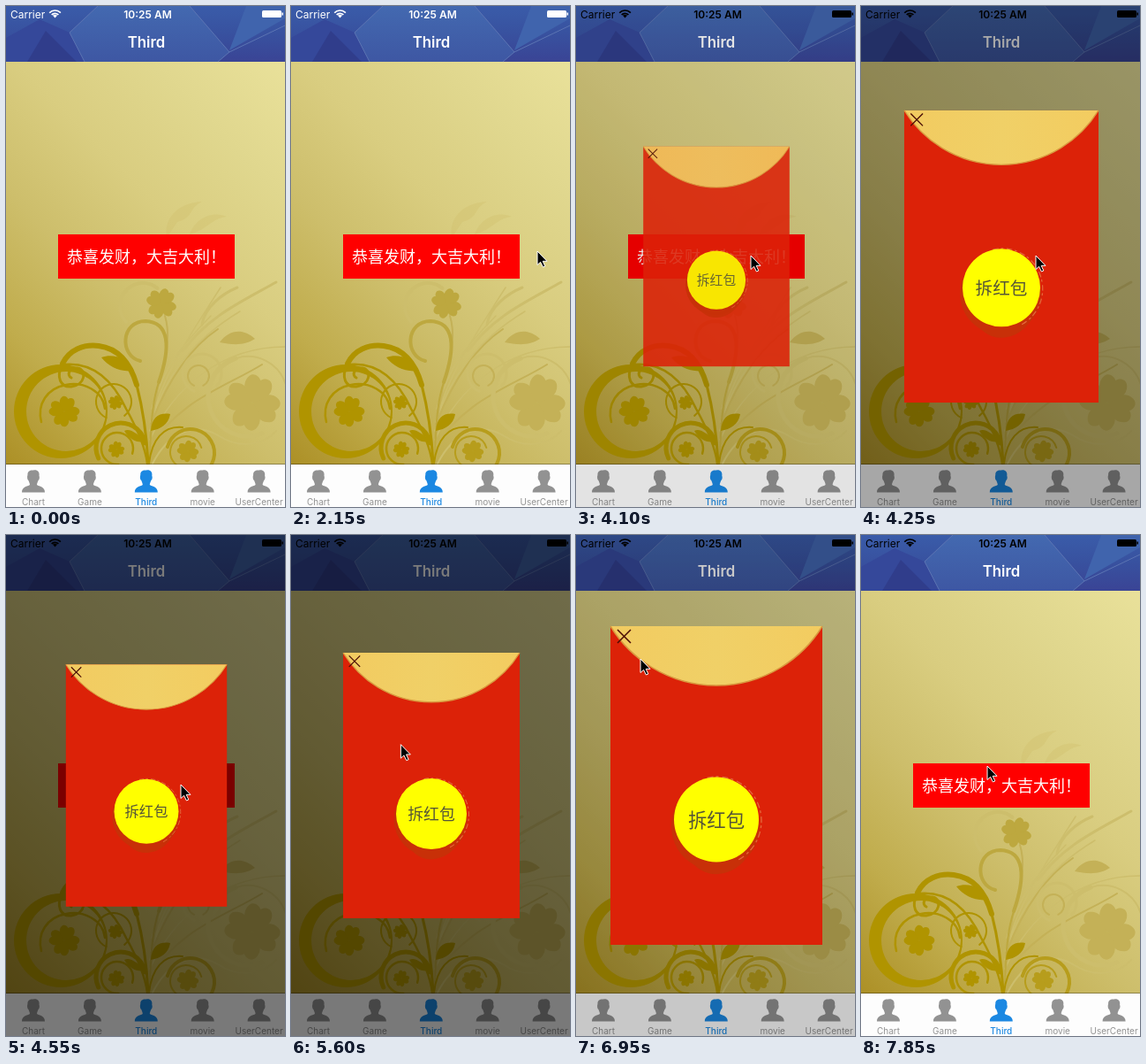
Animation of 316x566 px, one loop 8 s. Source, as an HTML page with a canvas:

```html
<!DOCTYPE html>
<html lang="zh-CN">
<head>
<meta charset="utf-8">
<title>Red packet</title>
<style>
html, body { margin: 0; height: 100%; overflow: hidden; }
canvas { display: block; }
</style>
</head>
<body>
<canvas id="stage" width="316" height="566"></canvas>
<script>
const ctx = document.getElementById('stage').getContext('2d');
const LATIN = 'Inter, Roboto, sans-serif';
const HAN = '"Noto Sans CJK SC", "Noto Sans CJK", sans-serif';
const LOOP = 8000, FIRST = 500, STEP = 150;
const OPEN = 4100, CLOSED = 7250;

// time, x, y of the pointer tip
const pointer = [
  [500, 287, 404], [650, 287, 404], [800, 241, 355], [950, 241, 376], [1100, 241, 376],
  [1250, 243, 350], [1550, 268, 275], [1700, 279, 255], [2000, 279, 255], [2150, 279, 277],
  [2300, 280, 308], [2600, 268, 370], [2750, 263, 380], [3200, 263, 380], [4100, 198, 282],
  [5000, 198, 282], [5150, 111, 217], [5300, 136, 257], [5450, 136, 257], [6350, 66, 135],
  [6500, 73, 140], [7400, 73, 140], [7850, 143, 261]
];
// time, scale, opacity, dimming
const popup = [
  [4100, .69, .88, .1], [4250, .917, 1, .34], [4400, .85, 1, .49], [4550, .76, 1, .52],
  [4850, .833, 1, .52], [6500, .833, 1, .52], [6650, .854, 1, .51], [6950, 1, 1, .21],
  [7100, .45, 1, .06], [7250, .01, 0, 0]
];

function sample(track, t) {
  const next = track.findIndex(key => key[0] > t);
  if (next < 0) return track[track.length - 1].slice(1);
  const a = track[Math.max(next - 1, 0)], b = track[next];
  const k = a === b ? 0 : (t - a[0]) / (b[0] - a[0]);
  return a.slice(1).map((v, i) => v + (b[i + 1] - v) * k);
}

function gradient(x0, y0, x1, y1, ...colors) {
  const g = ctx.createLinearGradient(x0, y0, x1, y1);
  colors.forEach((c, i) => g.addColorStop(i / (colors.length - 1), c));
  return g;
}

function rect(color, x, y, w, h) {
  ctx.fillStyle = color;
  ctx.fillRect(x, y, w, h);
}

function fill(color, path) {
  ctx.fillStyle = color;
  ctx.fill(new Path2D(path));
}

function line(color, width, path) {
  ctx.strokeStyle = color;
  ctx.lineWidth = width;
  ctx.stroke(new Path2D(path));
}

function disc(color, x, y, r) {
  ctx.fillStyle = color;
  ctx.beginPath();
  ctx.arc(x, y, r, 0, 7);
  ctx.fill();
}

function ring(color, width, x, y, r, from = 0, to = 2 * Math.PI) {
  ctx.strokeStyle = color;
  ctx.lineWidth = width;
  ctx.beginPath();
  ctx.arc(x, y, r, from, to);
  ctx.stroke();
}

function text(str, x, y, font, color, align = 'center') {
  ctx.font = font;
  ctx.fillStyle = color;
  ctx.textAlign = align;
  ctx.fillText(str, x, y);
}

// four heart-shaped petals
function clover(color, x, y, r, turn) {
  ctx.save();
  ctx.translate(x, y);
  ctx.scale(r, r);
  ctx.rotate(turn);
  for (let i = 0; i < 4; i++) {
    fill(color, 'M0 0C.2 -.35 .5 -.62 .85 -.45C1.05 -.35 1 -.1 .86 0C1 .1 1.05 .35 .85 .45C.5 .62 .2 .35 0 0Z');
    ctx.rotate(Math.PI / 2);
  }
  ctx.restore();
}

// ring that is thick on its left side and thin on its right
function crescent(color, x, y, r, thick) {
  ctx.fillStyle = color;
  ctx.beginPath();
  ctx.arc(x, y, r, 0, 7);
  ctx.closePath();
  ctx.moveTo(x + r, y);
  ctx.arc(x + thick / 2 - 1, y, r - thick / 2 - 1, 0, 7);
  ctx.fill('evenodd');
}

function wallpaper() {
  rect(gradient(0, 517, 385, 132, '#ac9026', '#c0ac4c', '#cdbe6b', '#d9cd80', '#e0d78e', '#e9e19a'), 0, 63, 316, 455);
  const dark = '#b09400', mid = '#bda83f', soft = '#c4b157', faint = '#cdbe6c';
  ctx.lineCap = 'round';
  ctx.globalAlpha = .35;
  fill(faint, 'M182 262C178 235 200 222 222 221C206 229 213 239 194 244ZM208 258C216 236 238 232 250 238C232 240 230 252 208 258Z');
  ctx.globalAlpha = 1;

  // fan of stems on the right
  line(faint, 3, 'M200 390C230 350 265 335 306 312M222 360C225 340 245 325 262 318');
  line(faint, 1.5, 'M163 480C175 420 215 375 265 345M164 470C180 410 210 370 243 318M163 490C190 430 245 385 316 385M165 455C180 405 198 385 232 350');
  line(soft, 2, 'M165 470C185 420 210 385 240 365M163 500C195 445 250 430 290 405');
  fill(soft, 'M242 380C252 366 268 363 282 376C268 385 254 382 242 380Z');
  ring(faint, 3, 222, 415, 22, 2, 7);
  ring(soft, 2, 218, 418, 12, 2, 7.4);
  ring(faint, 5, 274, 441, 45, 1.2, 4.4);
  ring(faint, 2, 274, 441, 45, 4.4, 6.6);
  clover(soft, 279, 448, 31, .35);
  line(faint, 2, 'M166 517C185 480 215 470 240 485C263 500 290 498 306 480');

  // upper flower and curl
  ring(faint, 4, 155, 339, 26, 2.4, 5.4);
  clover(mid, 176, 336, 17, .6);
  line(soft, 2, 'M180 350C192 390 165 420 164 500');
  line(mid, 4, 'M152 401C128 395 130 356 158 356C185 357 187 385 173 425');
  line(mid, 2, 'M173 425C168 440 164 460 163 510');

  // left spirals
  crescent(dark, 62, 458, 53, 14);
  line(dark, 2.5, 'M66 405C100 402 122 425 136 455C150 480 158 500 160 517M112 455C110 435 88 424 68 428C46 432 35 450 40 470');
  line(dark, 6, 'M64 404C72 388 88 382 105 384C128 387 141 404 148 428');
  line(dark, 3, 'M148 428C155 455 159 480 161 516M64 404C56 420 62 431 74 430C90 428 92 411 81 409C72 408 68 417 74 420');
  clover(dark, 66, 458, 17, .3);
  ring(dark, 2, 122, 447, 20, 2, 7.2);
  clover(dark, 124, 448, 8, .5);
  fill(dark, 'M108 397C122 392 137 398 145 412C129 414 117 408 108 397ZM164 480C165 464 174 459 186 461C184 473 175 478 164 480ZM158 492C150 484 140 476 134 480C140 490 148 494 158 492Z');
  ring(dark, 5, 130, 499, 28, 2.7, 6.1);
  ring(dark, 2.5, 126, 500, 18, 1.5, 6.6);
  clover(dark, 125, 501, 9, .2);
  ring('#b79d1c', 4, 209, 505, 27, 3.4, 7);
  ring('#b79d1c', 2, 204, 504, 18, 1.8, 6);
  clover('#b79d1c', 206, 503, 12, .4);
  line(dark, 2, 'M162 517C165 490 178 474 200 476');
  ctx.lineCap = 'butt';
}

function navBar() {
  rect(gradient(0, 0, 0, 63, '#3a5ca9', '#38519f', '#3a4495'), 0, 0, 316, 63);
  fill('#35489a', 'M0 36L38 15L72 30L89 63H0Z');
  fill('#303d8b', 'M24 63L45 28L80 63Z');
  fill(gradient(0, 0, 0, 63, '#4369b0', '#3e57a3'), 'M104 0H208L253 52L240 63H89L72 30Z');
  fill('#4064ad', 'M253 50L272 0H316V14Z');
  line('#5b74b3', 1, 'M104 0L72 30L89 63M208 0L253 52L240 63M253 52L316 22');
  text('Third', 159, 46.8, '600 16.8px ' + LATIN, '#fff');
}

function tabBar() {
  rect('#fdfdfd', 0, 518, 316, 48);
  rect('rgba(0,0,0,.3)', 0, 517, 316, 1);
  ['Chart', 'Game', 'Third', 'movie', 'UserCenter'].forEach((name, i) => {
    const x = 31 + i * 63.9, color = i === 2 ? '#1b88e2' : '#929292';
    ctx.save();
    ctx.translate(x, 524);
    fill(color, 'M-6.5 6C-7 1 -3 0 0 .5C4 -.5 7.5 2 6.5 7C7.5 8 6.5 12 5.5 12C5 14 4 15 4 17C7 19 13 19 13 25.5H-13C-13 19 -7 19 -4 17C-4 15 -5 14 -5.5 12C-6.5 12 -7.5 8 -6.5 6Z');
    ctx.restore();
    text(name, x, 563.5, (i === 2 ? '500' : '400') + ' 10px ' + LATIN, color);
  });
}

function statusBar(color) {
  text('Carrier', 5, 13.5, '400 12px ' + LATIN, color, 'left');
  text('10:25 AM', 160.5, 13.5, '600 12px ' + LATIN, color);
  for (const r of [8.5, 5.2]) ring(color, 1.7, 55.5, 13.5, r, -2.4, -.74);
  fill(color, 'M55.5 13.5L53 10.7Q55.5 9 58 10.7Z');
  ctx.beginPath();
  ctx.roundRect(290, 5, 22, 8, 1.5);
  ctx.fill();
  rect(color, 312.5, 7.5, 1.5, 3);
}

function envelope(scale, opacity) {
  ctx.save();
  ctx.globalAlpha = opacity;
  ctx.translate(159, 283);
  ctx.scale(scale, scale);
  ctx.translate(-120, -180);
  rect('#dc2208', 0, 0, 240, 360);
  const flap = 'M0 0A141 141 0 0 0 240 0';
  fill(gradient(0, 0, 240, 0, '#f2cb60', '#f0d067', '#f3cc60'), flap + 'Z');
  line('#d9993f', 1.5, flap);
  disc('#c83008', 119, 226, 50);
  fill('#c83008', 'M82 252Q98 282 122 280Q145 278 158 256Z');
  ctx.setLineDash([7, 3, 3, 4]);
  ring('#e4683c', 1.3, 121, 220, 50, -1.8, 1.1);
  ctx.setLineDash([]);
  disc('#ffff00', 120, 218.5, 48);
  text('拆红包', 120, 226.5, '400 21.4px ' + HAN, '#555538');
  line('#4a0d05', 1.5, 'M8 4L23 19M23 4L8 19');
  ctx.restore();
}

function arrow(x, y) {
  ctx.save();
  ctx.translate(x, y);
  const shape = 'M0 0V15.5L3.6 12.3L6.4 18L8.8 17L6.2 11.3H11Z';
  fill('#000', shape);
  line('#fff', 1, shape);
  ctx.restore();
}

function draw(now) {
  const t = now % LOOP;
  const held = t < FIRST ? 0 : FIRST + Math.floor((t - FIRST) / STEP) * STEP;
  wallpaper();
  navBar();
  tabBar();
  rect('#ff0000', 59, 258, 200, 50);
  text('恭喜发财，大吉大利！', 69, 289.5, '300 18px ' + HAN, '#fff', 'left');
  if (held >= OPEN && held < CLOSED) {
    const [scale, opacity, dim] = sample(popup, held);
    rect(`rgba(0,0,0,${dim})`, 0, 0, 316, 566);
    envelope(scale, opacity);
  }
  statusBar(held >= OPEN ? '#000' : '#fff');
  if (held >= FIRST) arrow(...sample(pointer, held));
}

function tick() {
  draw(performance.now());
  requestAnimationFrame(tick);
}
tick();
</script>
</body>
</html>
```
